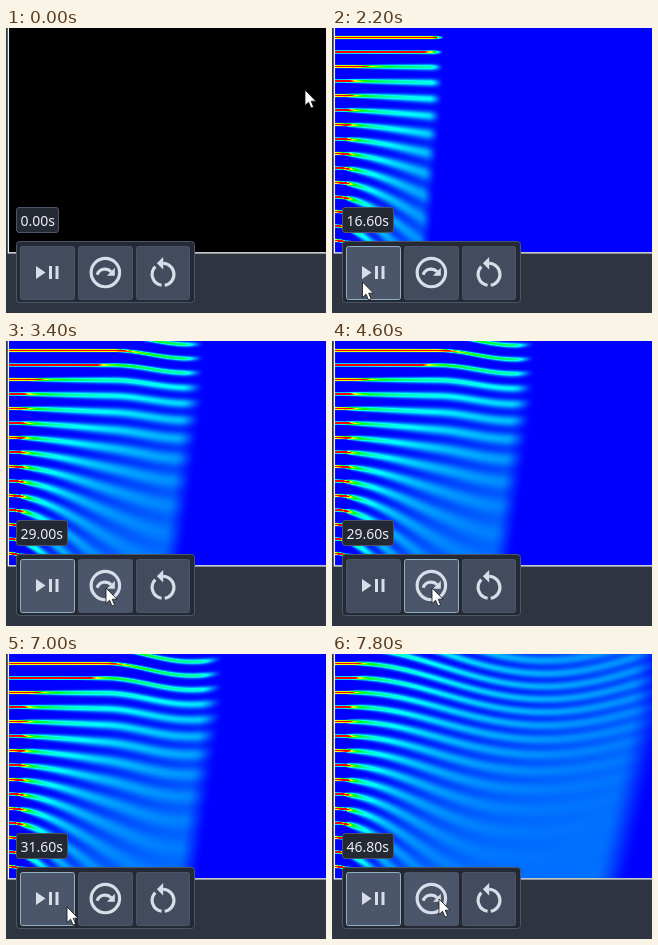
Recreate the animation shown at these times as an HTML page with a canvas. Size 320 px wide and 285 px high, loop 8000 ms.

```html
<!DOCTYPE html>
<html lang="en">
<head>
<meta charset="utf-8">
<title>Flow simulation</title>
<style>
html, body { margin: 0; width: 100%; height: 100%; overflow: hidden; background: #2e3440; }
#stage { position: relative; width: 320px; height: 285px; overflow: hidden; }
#stage > * { position: absolute; }
#field { left: 3px; top: 0; background: #000; }
#clock {
  left: 10px; top: 179px; height: 24px; padding: 0 3.5px;
  border: 1px solid #4c566a; border-radius: 3px; background: #242933; color: #eceff4;
  font: 14px/25px "Noto Sans", sans-serif; white-space: nowrap;
}
svg { left: 0; top: 0; }
.button rect { fill: #434c5e; stroke: #4c566a; }
.button.hover rect, .button.focus rect { fill: #4c566a; }
.button.focus rect { stroke: #8fb0c0; }
.solid { fill: #d8dee9; }
.line { fill: none; stroke: #d8dee9; stroke-width: 2; }
</style>
</head>
<body>
<div id="stage">
  <canvas id="field" width="317" height="224"></canvas>
  <svg width="320" height="285">
    <path d="M2.4 0V224.8H320" fill="none" stroke="#f4f6f8" stroke-width="1.3"/>
    <rect x="10.5" y="213.5" width="178" height="61" rx="3" fill="#242933" stroke="#4c566a"/>
    <g class="button">
      <rect x="14.5" y="218.5" width="54" height="53" rx="2"/>
      <path class="solid" d="M30 238V251L39.5 244.5ZM43 238h3v13h-3ZM49.5 238h3v13h-3Z"/>
    </g>
    <g class="button">
      <rect x="72.5" y="218.5" width="54" height="53" rx="2"/>
      <g transform="translate(80.4 225.6) scale(1.58)">
        <circle class="line" cx="12" cy="12" r="9"/>
        <path class="line" d="M6.8 13.4A5.3 5.3 0 0 1 15.7 11.5"/>
        <path class="solid" d="M18 9V14H13Z"/>
      </g>
    </g>
    <g class="button">
      <rect x="130.5" y="218.5" width="53" height="53" rx="2"/>
      <g transform="translate(138.2 225.8) scale(1.58)">
        <path class="line" d="M12 6A7 7 0 0 1 13 19.9M11 19.9A7 7 0 0 1 7.05 8.05"/>
        <path class="solid" d="M12 2V10L8 6Z"/>
      </g>
    </g>
    <path id="cursor" fill="#fff" stroke="#111" stroke-width=".8" d="M0 0V15.5L3.6 12.2 6 18 8.6 16.9 6.2 11.2H11Z"/>
  </svg>
  <div id="clock">0.00s</div>
</div>
<script>
const LOOP = 8000, TICK = 200, W = 317, H = 224;
const PITCH = 14.5, FIRST = 9.5, MEAN = 0.11;

// keys: [ms, simulated seconds]
const CLOCK = [[0, 0], [1000, 0], [1200, 1.2], [2800, 25.8], [3000, 29], [3800, 29], [4000, 29.2],
  [4600, 29.6], [6000, 30.6], [6400, 31], [6800, 31.2], [7000, 31.6], [7800, 46.8]];
// keys: [ms, x, y]
const POINTER = [[0, 299, 62], [1000, 32, 262], [1200, 30.5, 254], [3000, 30.5, 254], [3400, 100, 247],
  [6400, 100, 247], [7000, 61, 253], [7400, 61, 253], [7800, 107, 245]];

const clock = document.getElementById('clock');
const cursor = document.getElementById('cursor');
const buttons = [...document.querySelectorAll('.button')];
const ctx = document.getElementById('field').getContext('2d');
const image = ctx.createImageData(W, H);

const clamp = v => Math.min(1, Math.max(0, v));
const mix = (a, b, u) => a + (b - a) * u;
const smooth = (a, b, v) => {
  const u = clamp((v - a) / (b - a));
  return u * u * (3 - 2 * u);
};

function sample(keys, ms, column = 1) {
  const i = keys.findIndex(k => k[0] > ms);
  if (i < 0) return keys[keys.length - 1][column];
  const a = keys[i - 1], b = keys[i];
  return mix(a[column], b[column], (ms - a[0]) / (b[0] - a[0]));
}

// Inverts y = s + c s^3 to find the inlet height a streamline started from.
function inletHeight(y, c) {
  let s = y / (1 + c * y * y * 0.4);
  for (let i = 0; i < 4; i++) s -= (s + c * s * s * s - y) / (1 + 3 * c * s * s);
  return s;
}

// Evenly spaced jets, each blurred to a Gaussian of the given variance.
function dye(s, variance) {
  const d = s - FIRST - PITCH * Math.round((s - FIRST) / PITCH);
  let sum = 0;
  for (let k = -1; k <= 1; k++) sum += Math.exp(-((d + k * PITCH) ** 2) / (2 * variance));
  return MEAN * PITCH * sum / Math.sqrt(2 * Math.PI * variance);
}

function drawField(t) {
  if (t <= 0) {
    ctx.clearRect(0, 0, W, H);
    return;
  }
  const late = smooth(28, 46, t);
  const sagStart = mix(105, 20, late), sagSpan = mix(150, 380, late);
  const sagDepth = mix(10 * smooth(18, 33, t), 42, late);
  const calm = 100 * (1 - 0.92 * late);
  const reach = 5 + 6.1 * t + 0.02 * t * t;
  const softness = 2 + 0.75 * t;
  const px = image.data;
  for (let x = 0; x < W; x++) {
    const bend = 1.85e-5 * smooth(0, 170, x) * (1 - 0.35 * smooth(190, 320, x));
    const sag = sagDepth * Math.sin(Math.PI * clamp((x - sagStart) / sagSpan)) ** 2;
    for (let y = 0; y < H; y++) {
      const edge = reach - 3 - Math.max(0, y - 60) * t * 0.0047;
      const front = 1 - smooth(edge - softness, edge, x);
      let v = 0;
      if (front > 0) {
        const s = inletHeight(y + 0.5 - sag * (1 - y / 300), bend);
        const run = Math.max(0, x - 10 - calm * Math.exp(-((s / 32) ** 4)));
        const spread = 0.09 * (0.3 + (s / 100) ** 2 + 0.5 * late);
        const gain = 1 + 1.2 * Math.exp(-run / 8);
        v = clamp(front * gain * dye(s, 0.5 + spread * run));
      }
      const i = 4 * (y * W + x);
      px[i] = 255 * clamp(4 * v - 2);
      px[i + 1] = 255 * clamp(Math.min(4 * v, 4 - 4 * v));
      px[i + 2] = 255 * clamp(2 - 4 * v);
      px[i + 3] = 255;
    }
  }
  ctx.putImageData(image, 0, 0);
}

function drawControls(ms) {
  const x = sample(POINTER, ms, 1), y = sample(POINTER, ms, 2);
  cursor.setAttribute('transform', `translate(${x} ${y})`);
  const focus = ms < 1200 ? -1 : ms >= 4000 && ms < 7000 ? 1 : 0;
  buttons.forEach((button, i) => {
    const left = 14 + 58 * i;
    button.classList.toggle('hover', x >= left && x <= left + 55 && y >= 218 && y <= 272);
    button.classList.toggle('focus', i === focus);
  });
}

let shownTick = -1, shownTime = -1;
function draw(now) {
  const tick = Math.floor((now % LOOP) / TICK);
  if (tick === shownTick) return;
  shownTick = tick;
  const ms = tick * TICK;
  const t = Math.round(sample(CLOCK, ms) * 5) / 5;
  drawControls(ms);
  if (t === shownTime) return;
  shownTime = t;
  clock.textContent = t.toFixed(2) + 's';
  drawField(t);
}

const start = performance.now();
function loop() {
  draw(performance.now() - start);
  requestAnimationFrame(loop);
}
loop();
</script>
</body>
</html>
```
